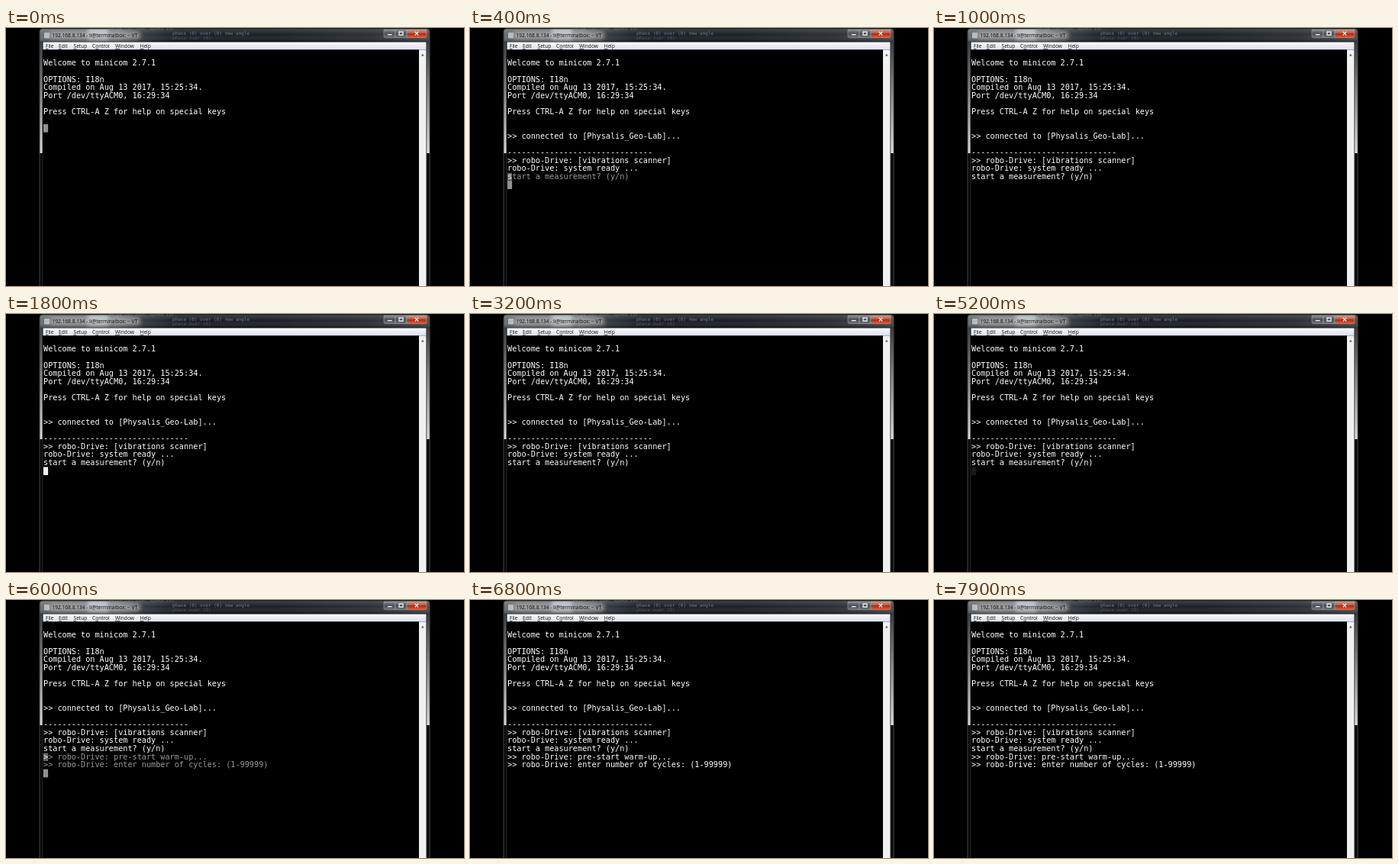
An HTML page that plays this animation: 600 px wide and 338 px high, repeating every 8000 ms.

```html
<!DOCTYPE html>
<html lang="en">
<head>
<meta charset="utf-8">
<title>Serial terminal</title>
<style>
  html, body { margin: 0; width: 100%; height: 100%; overflow: hidden; background: #000; }
  svg { display: block; width: 600px; height: 338px; }
  .ui { font: 6.6px "Open Sans", sans-serif; }
  #terminal { isolation: isolate; }
  #terminal text { font: 10.2px "DejaVu Sans Mono", monospace; fill: #fff; white-space: pre; }
  #terminal > * { mix-blend-mode: plus-lighter; }
</style>
</head>
<body>
<svg viewBox="0 0 600 338">
  <defs>
    <linearGradient id="glass">
      <stop offset="0" stop-color="#666a6e"/>
      <stop offset=".2" stop-color="#6c7176"/>
      <stop offset=".27" stop-color="#2c323a"/>
      <stop offset=".36" stop-color="#11161e"/>
      <stop offset=".6" stop-color="#141921"/>
      <stop offset=".85" stop-color="#24292f"/>
      <stop offset="1" stop-color="#454a50"/>
    </linearGradient>
    <linearGradient id="sheen" x2="0" y2="1">
      <stop offset="0" stop-color="#fff" stop-opacity=".2"/>
      <stop offset=".5" stop-color="#fff" stop-opacity=".03"/>
      <stop offset="1" stop-color="#000" stop-opacity=".3"/>
    </linearGradient>
    <linearGradient id="edge" x2="0" y2="1">
      <stop offset="0" stop-color="#3c4044"/>
      <stop offset=".45" stop-color="#85888b"/>
      <stop offset="1" stop-color="#d8dadc"/>
    </linearGradient>
    <linearGradient id="menu" x2="0" y2="1">
      <stop offset="0" stop-color="#fbfcfd"/>
      <stop offset=".5" stop-color="#e9ecf3"/>
      <stop offset="1" stop-color="#dde1ec"/>
    </linearGradient>
    <linearGradient id="button" x2="0" y2="1">
      <stop offset="0" stop-color="#8b9095"/>
      <stop offset=".5" stop-color="#4a4f55"/>
      <stop offset="1" stop-color="#6d7379"/>
    </linearGradient>
    <linearGradient id="close" x2="0" y2="1">
      <stop offset="0" stop-color="#d9917f"/>
      <stop offset=".48" stop-color="#c4513a"/>
      <stop offset=".52" stop-color="#ab2a14"/>
      <stop offset="1" stop-color="#cf6542"/>
    </linearGradient>
    <filter id="soft" x="-30%" y="-100%" width="160%" height="300%"><feGaussianBlur stdDeviation="2.5"/></filter>
    <filter id="haze"><feGaussianBlur stdDeviation=".5"/></filter>
    <clipPath id="bar"><path d="M44.5 18V5q0-3.5 4-3.5H551q3.8 0 3.8 3.5V18z"/></clipPath>
  </defs>

  <rect width="600" height="338"/>

  <!-- Window frame -->
  <path d="M44 338V5q0-4 4-4H551q4 0 4 4V338" fill="#08090a" stroke="#54585c" stroke-width=".8"/>
  <path d="M44.5 18H47.6V164H44.5zM551.2 18H554.8V164H551.2z" fill="url(#edge)"/>
  <path d="M48 164V338M551 164V338" stroke="#3c4044" stroke-width=".7"/>
  <g clip-path="url(#bar)">
    <rect x="44" width="512" height="18" fill="url(#glass)"/>
    <rect x="107" y="0" width="27" height="17" fill="#c3cbd8" opacity=".8" filter="url(#soft)"/>
    <rect x="57" y="5" width="119" height="10" rx="4" fill="#c4c4c4" opacity=".55" filter="url(#soft)"/>
  </g>
  <g fill="#a6b0bd" font-family="DejaVu Sans Mono, monospace" font-size="6" filter="url(#haze)">
    <text x="134" y="1.8" opacity=".4">value (0) over speed (0)</text>
    <text x="218" y="8.6" opacity=".6">phase (0) over (0) new angle</text>
    <text x="218" y="15.4" opacity=".35">phase over (0)</text>
  </g>
  <rect x="44" width="512" height="18" fill="url(#sheen)" clip-path="url(#bar)"/>
  <rect x="50" y="6" width="7" height="7.5" rx="1" fill="#b9bcc0"/>
  <text class="ui" x="60.5" y="12.2" fill="#080808">192.168.8.134 - li@terminalbox: ~ VT</text>

  <g transform="translate(0 .6)">
    <g stroke="#aeb2b6" stroke-width=".5">
      <path d="M495 1.5H510V12H497q-2 0-2-2z" fill="url(#button)"/>
      <path d="M510 1.5H525V12H510z" fill="url(#button)"/>
      <path d="M525 1.5H551V10q0 2-2 2H525z" fill="url(#close)"/>
    </g>
    <g fill="none" stroke="#fff" stroke-width="1.2">
      <path d="M500 8H505.5M515 4.5H520V8.5H515z"/>
      <path d="M535.8 4.3L540.2 8.7M540.2 4.3L535.8 8.7"/>
    </g>
  </g>

  <!-- Menu, terminal area and scroll bar -->
  <rect x="48.5" y="18.5" width="502" height="10" fill="url(#menu)"/>
  <g id="menuItems" class="ui" fill="#111"></g>
  <rect x="48.5" y="28.5" width="492.5" height="310"/>
  <rect x="541" y="28.5" width="9.5" height="310" fill="#f1f1f1"/>
  <path d="M543.9 36.6L545.8 33.8L547.7 36.6z" fill="#555"/>

  <g id="terminal"></g>
</svg>
<script>
const LOOP = 8000, STEP = 100, BLINK = 530;
const ROW = 10.63, TOP = 41, LEFT = 49;
const CONNECT = 200, READY = 440, WARM_UP = 6040;

// [row, time of appearance, text]
const lines = [
  [0, 0, 'Welcome to minicom 2.7.1'],
  [2, 0, 'OPTIONS: I18n'],
  [3, 0, 'Compiled on Aug 13 2017, 15:25:34.'],
  [4, 0, 'Port /dev/ttyACM0, 16:29:34'],
  [6, 0, 'Press CTRL-A Z for help on special keys'],
  [9, CONNECT, '>> connected to [Physalis_Geo-Lab]...'],
  [11, CONNECT, '-'.repeat(31)],
  [12, CONNECT, '>> robo-Drive: [vibrations scanner]'],
  [13, CONNECT, 'robo-Drive: system ready ...'],
  [14, READY, 'start a measurement? (y/n)'],
  [15, WARM_UP, '>> robo-Drive: pre-start warm-up...'],
  [16, WARM_UP, '>> robo-Drive: enter number of cycles: (1-99999)']
];

// [row, first shown, moved away]
const cursors = [
  [8, 40, CONNECT],
  [14, CONNECT, READY],
  [15, READY, WARM_UP],
  [17, WARM_UP, LOOP]
];

// [x, label, index of the underlined letter]
const menu = [[52, 'File', 0], [69, 'Edit', 0], [88.5, 'Setup', 0],
  [113, 'Control', 1], [143, 'Window', 0], [175.5, 'Help', 0]];

function add(parent, tag, attributes, text = '') {
  const node = document.createElementNS('http://www.w3.org/2000/svg', tag);
  for (const name in attributes) node.setAttribute(name, attributes[name]);
  node.textContent = text;
  return parent.appendChild(node);
}

const menuItems = document.getElementById('menuItems');
for (const [x, label, key] of menu) {
  const item = add(menuItems, 'text', { x, y: 26 });
  [...label].forEach((letter, i) =>
    add(item, 'tspan', i === key ? { 'text-decoration': 'underline' } : {}, letter));
}

const terminal = document.getElementById('terminal');
const parts = [
  ...lines.map(([row, start, text]) => ({
    node: add(terminal, 'text', { x: LEFT, y: TOP + 8.3 + row * ROW }, text),
    spans: [[start, LOOP]]
  })),
  ...cursors.map(([row, start, end]) => {
    const spans = [];
    for (let on = start; on < end; on += 2 * BLINK) spans.push([on, Math.min(on + BLINK, end)]);
    const box = { x: LEFT, y: TOP + row * ROW, width: 6.1, height: 10.6, fill: '#f4f4f4' };
    return { node: add(terminal, 'rect', box), spans };
  })
];

// Each step shows the average over its exposure, so changes inside it look half faded.
function exposure(spans, time) {
  return spans.reduce((sum, [start, end]) =>
    sum + Math.max(0, Math.min(end, time + STEP) - Math.max(start, time)), 0) / STEP;
}

function draw() {
  const time = Math.floor(performance.now() % LOOP / STEP) * STEP;
  for (const { node, spans } of parts) node.style.opacity = exposure(spans, time);
  requestAnimationFrame(draw);
}
draw();
</script>
</body>
</html>
```
